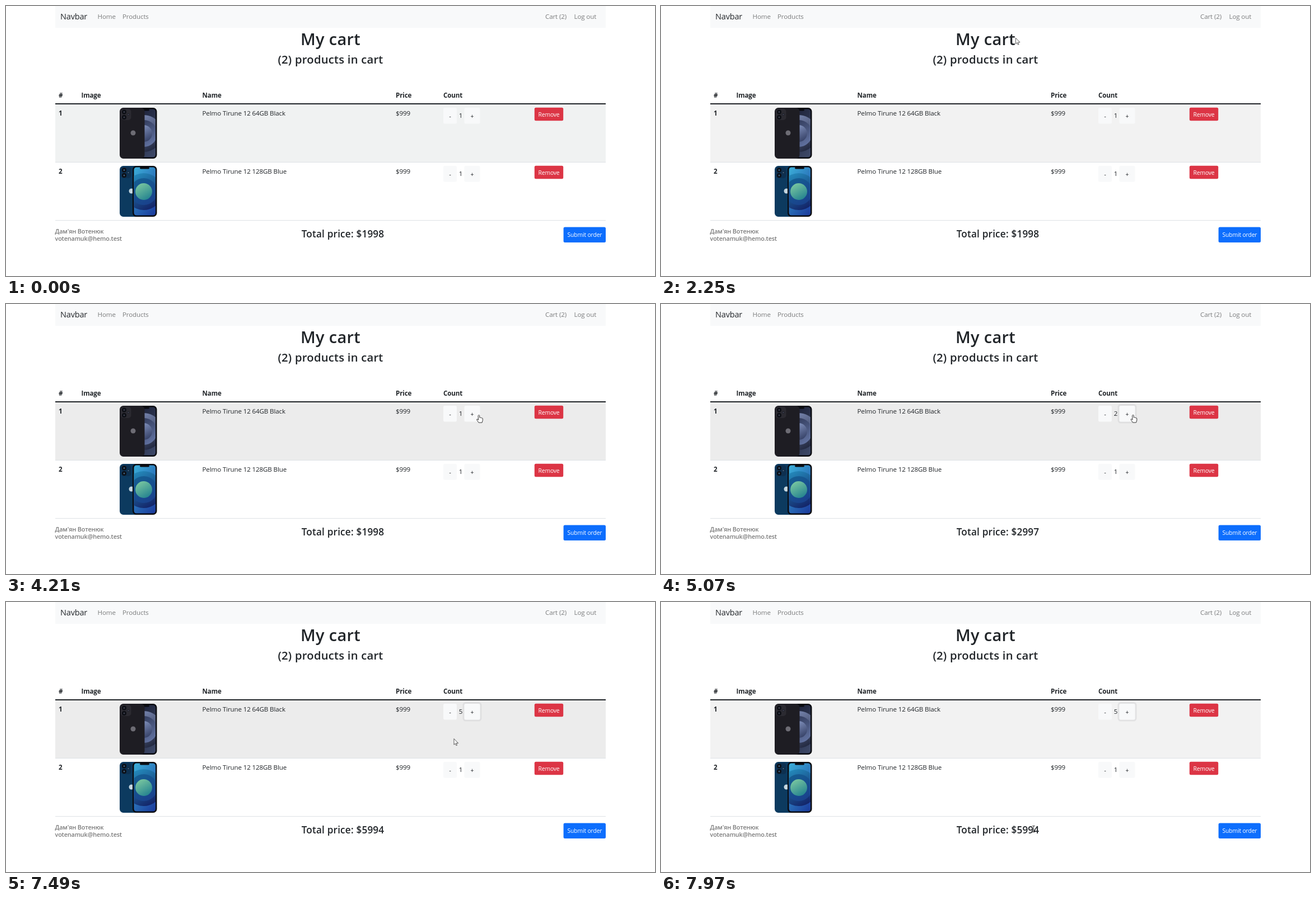
Animation, 1159 px wide and 483 px high, one loop 8000 ms. Source, as an HTML page:

```html
<!DOCTYPE html>
<html lang="en">
<head>
<meta charset="utf-8">
<title>My cart</title>
<style>
  html, body { margin: 0; width: 100%; height: 100%; overflow: hidden; background: #fff; }
  svg { display: block; width: 1159px; height: 483px; }
  text { font: 11.6px "Open Sans", "Noto Sans", sans-serif; letter-spacing: -.012em; fill: #212529; }
  .mid { text-anchor: middle; }
  .b { font-weight: 700; }
  .h { font-weight: 600; letter-spacing: .01em; }
  .nav { fill: #7b7c7d; }
  .brand { font-size: 14.5px; }
  .small { font-size: 10.3px; }
  .user { font-size: 10.8px; font-weight: 600; fill: #7a7a7a; }
  .white { fill: #fff; }
</style>
</head>
<body>
<svg id="stage" viewBox="0 0 1159 483"></svg>
<script>
const LOOP = 8000;
const stage = document.getElementById('stage');

const rect = (x, y, w, h, fill, r = 0, more = '') =>
  `<rect x="${x}" y="${y}" width="${w}" height="${h}" rx="${r}" fill="${fill}" ${more}/>`;
const circle = (x, y, r, fill) => `<circle cx="${x}" cy="${y}" r="${r}" fill="${fill}"/>`;
const text = (x, y, str, cls = '', more = '') =>
  `<text x="${x}" y="${y}" class="${cls}" ${more}>${str}</text>`;
const shade = (id, from, to) =>
  `<linearGradient id="${id}" x1=".2" y1="0" x2=".8" y2="1"><stop stop-color="${from}"/><stop offset="1" stop-color="${to}"/></linearGradient>`;

// Back panel and front screen of a product; shaded discs run from the outside in.
function phone(id, y, look) {
  const back = rect(203, y, 44.5, 91, look.back, 6.5)
    + rect(205, y + 2, 18.5, 20, look.bump, 5)
    + [[211, 7.5], [211, 17], [218.5, 12]].map(([x, dy], i) =>
        circle(x, y + dy, i < 2 ? 4 : 2, '#0c0e14') + circle(x, y + dy, 1.5, look.lens)).join('')
    + circle(look.mark, y + 45, 4.5, look.badge);
  const front = rect(226, y, 43.5, 91, '#0a0b10', 6.5)
    + `<clipPath id="${id}">${rect(228.5, y + 2.5, 38.5, 86, '#000', 4.5)}</clipPath>`
    + look.shades.map(([from, to], i) => shade(id + i, from, to)).join('')
    + `<g clip-path="url(#${id})">`
    + look.shades.map((_, i) => i
        ? circle(246, y + 46, 42 - i * 9, `url(#${id + i})`)
        : rect(228, y, 40, 91, `url(#${id + i})`)).join('')
    + '</g>' + rect(239, y + 2, 17, 3.5, '#0a0b10', 1.7);
  return look.backFirst ? back + front : front + back;
}

function row(n, y, name, look) {
  return rect(88, y - 6, 983, 103, '#fff', 0, `id="row${n}"`)
    + rect(88, y + 97, 983, 1, '#dee2e6')
    + text(94, y + 14, n, 'b')
    + phone('screen' + n, y, look)
    + text(350.5, y + 14, name)
    + text(696, y + 14, '$999')
    + rect(781, y, 24, 28.5, '#f8f9fa', 2.5)
    + text(793, y + 19, '-', 'small mid')
    + text(812, y + 18, '1', 'mid', `id="count${n}"`)
    + (n === 1 ? rect(817, y - 1.5, 31, 31.5, 'none', 4, 'id="ring" stroke="#d3d4d5" stroke-width="3"') : '')
    + rect(818.5, y, 28, 28.5, '#f8f9fa', 2.5)
    + text(832.5, y + 19, '+', 'small mid')
    + rect(943.8, y - .2, 51.4, 23.5, '#dc3545', 2.5)
    + text(969.5, y + 16, 'Remove', 'small mid white');
}

const black = { back: '#1e1d23', bump: '#2b2a31', lens: '#3b3d4c', badge: '#6d6c74', mark: 227,
  shades: [['#1b2036', '#3c4766'], ['#8291bd', '#1c2238'], ['#2c3554', '#6475a4'], ['#8b9cc8', '#323d62']] };
const blue = { back: '#0c3a5f', bump: '#0d3050', lens: '#3a5f80', badge: '#c3d5df', mark: 224, backFirst: true,
  shades: [['#3aa9d6', '#1c3f9e'], ['#2590c0', '#121c62'], ['#155f92', '#1a3f8c'], ['#7cc9a0', '#21808f']] };

stage.innerHTML =
  rect(88, 0, 983, 39, '#f8f9fa')
  + text(97, 24, 'Navbar', 'brand')
  + text(163.5, 23, 'Home', 'nav') + text(208, 23, 'Products', 'nav')
  + text(963, 23, 'Cart (2)', 'nav') + text(1014.5, 23, 'Log out', 'nav')
  + text(579.5, 69.5, 'My cart', 'h mid', 'style="font-size:29px"')
  + text(579.5, 103, '(2) products in cart', 'h mid', 'style="font-size:20.3px"')
  + [[94, '#'], [134.5, 'Image'], [350.5, 'Name'], [696, 'Price'], [781, 'Count']]
      .map(([x, s]) => text(x, 164, s, 'b')).join('')
  + row(1, 182, 'Pelmo Tirune 12 64GB Black', black)
  + row(2, 286, 'Pelmo Tirune 12 128GB Blue', blue)
  + rect(88, 174, 983, 2, '#212529')
  + text(87.5, 406.5, 'Дам\'ян Вотенюк', 'user')
  + text(87.5, 420, 'votenamuk@hemo.test', 'user')
  + text(601.5, 413.5, '', 'h mid', 'id="total" style="font-size:17.2px"')
  + rect(995.6, 395.5, 75.4, 27.5, '#0d6efd', 2.5)
  + text(1033.5, 413, 'Submit order', 'small mid white')
  + `<g id="cursor" stroke-linejoin="round" stroke-linecap="round">
      <path id="arrow" d="M0 0V10.3L2.4 8.1L4 11.8L5.6 11.1L4 7.5H7.2Z" fill="#fff" stroke="#333" stroke-width=".8"/>
      <path id="hand" d="M-1.2 1.2Q0 -.8 1.2 1.2V5Q2.4 4 3.2 5.4Q4.6 4.6 5.2 6Q6.6 5.4 6.8 7V10L5.6 14H-.4L-3.6 9.4Q-4.2 7.2 -2.4 7.8L-1.2 9Z" fill="#fff" stroke="#222" stroke-width=".9"/>
      <path id="beam" d="M-2 -5.5H2M0 -5.5V5.5M-2 5.5H2" fill="none" stroke="#333" stroke-width=".9"/>
    </g>`;

const el = Object.fromEntries([...stage.querySelectorAll('[id]')].map(e => [e.id, e]));

// Pointer path: time, x, y
const path = [
  [380, 1138, 472], [934, 991, 127.5], [1142, 873, 70], [1970, 676, 55.5],
  [2251, 633.5, 57.5], [2480, 558, 66], [2820, 572, 95], [3640, 861, 210],
  [3720, 827, 196.5], [3790, 833, 197], [4000, 860, 200], [4210, 843, 198],
  [7270, 843, 198], [7480, 800, 245], [7690, 685, 372], [7760, 666.5, 392], [7970, 665.5, 406]
];
const clicks = [4940, 5820, 6410, 7070];
const textBoxes = [[528, 46, 632, 74], [488, 86, 671, 108], [529, 397, 675, 418]];
const plusButton = [818, 182, 847, 210];

function pointAt(t) {
  if (t <= path[0][0]) return path[0].slice(1);
  const i = path.findIndex(p => p[0] >= t);
  if (i < 0) return path.at(-1).slice(1);
  const [t0, x0, y0] = path[i - 1], [t1, x1, y1] = path[i];
  const k = (t - t0) / (t1 - t0);
  return [x0 + (x1 - x0) * k, y0 + (y1 - y0) * k];
}

// The pointer is redrawn about 14 times a second.
function snap(t) {
  const [start, step] = t < 7300 ? [380, 69.3] : [7340, 70];
  return start + Math.floor((t - start + 10) / step) * step;
}

const inside = ([x, y], [l, top, r, b]) => x >= l && x <= r && y >= top && y <= b;

function draw(t) {
  const s = snap(t), pos = pointAt(s);
  const kind = inside(pos, plusButton) ? 'hand' : textBoxes.some(b => inside(pos, b)) ? 'beam' : 'arrow';
  for (const k of ['arrow', 'hand', 'beam']) el[k].style.display = k === kind ? '' : 'none';
  el.cursor.style.display = t < 375 ? 'none' : '';
  el.cursor.setAttribute('transform', `translate(${pos})`);

  // Row highlight trails the pointer by one step.
  const y = s < 2000 ? 0 : pointAt(s - 70)[1];
  el.row1.setAttribute('fill', y > 175 && y < 279 ? '#ececec' : t < 375 ? '#f0f2f2' : '#f2f2f2');
  el.row2.setAttribute('fill', y >= 279 && y < 383 ? '#ececec' : '#fff');

  const count = 1 + clicks.filter(c => t >= c).length;
  el.count1.textContent = count;
  el.total.textContent = 'Total price: $' + 999 * (count + 1);
  el.ring.setAttribute('opacity', Math.max(0, Math.min(1, (t - 4870) / 150)) / 2);
}

function frame(now) {
  draw(now % LOOP);
  requestAnimationFrame(frame);
}
draw(0);
requestAnimationFrame(frame);
</script>
</body>
</html>
```
